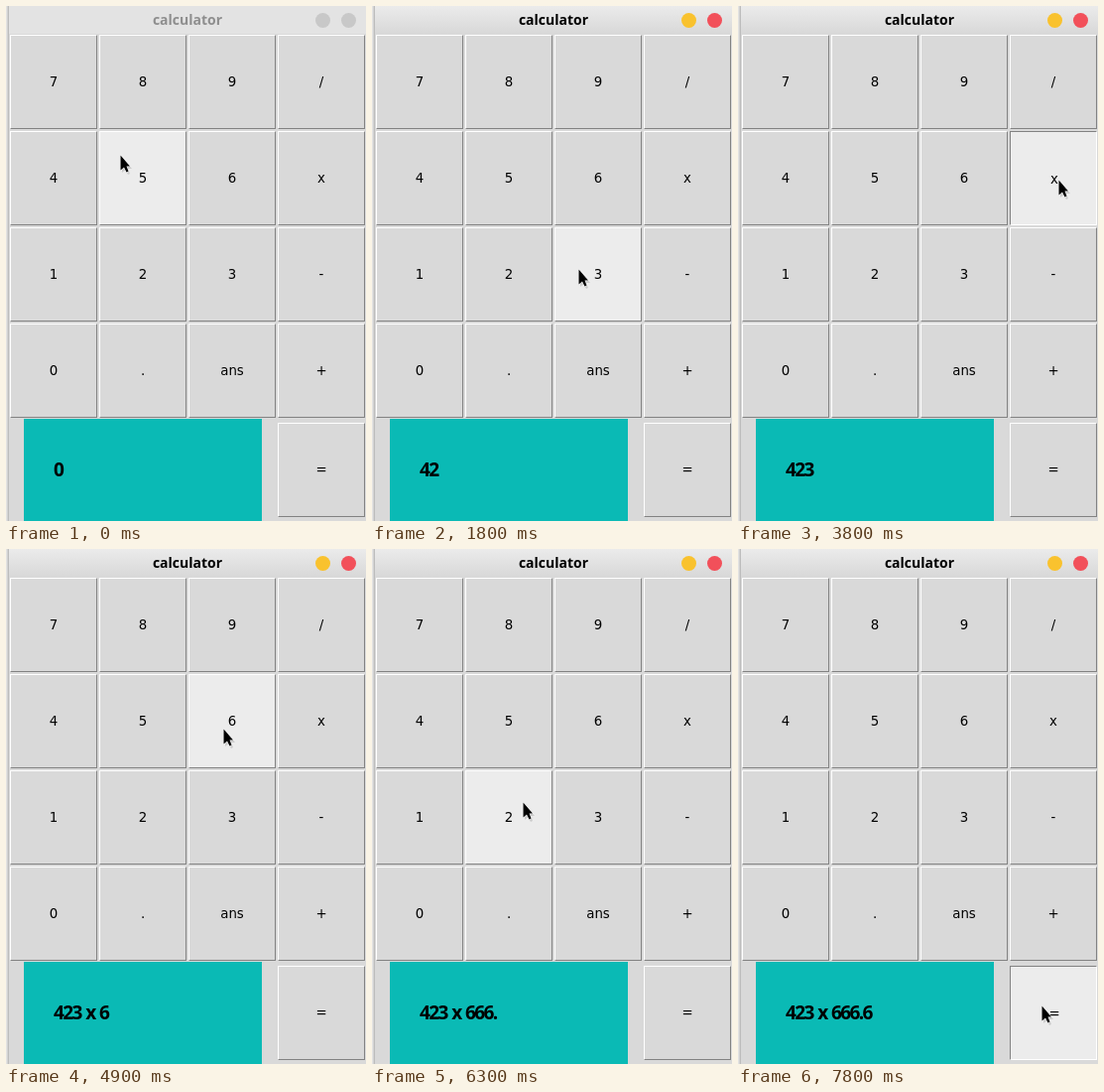
Animation, 363 px wide and 519 px high, one loop 8 s. Source, as an HTML page:

```html
<!DOCTYPE html>
<html lang="en">
<head>
<meta charset="utf-8">
<title>calculator</title>
<style>
  html, body { margin: 0; width: 363px; height: 519px; overflow: hidden; background: #d9d9d9; }
  div { position: absolute; box-sizing: border-box; }
  #edge { left: 0; top: 0; width: 3px; height: 519px; background: linear-gradient(90deg, #e2e2e2 1px, #d2d2d2 1px 2px, #bdbdbd 2px); }
  #bar { left: 3px; top: 0; width: 360px; height: 28px; background: #e3e3e3; color: #8e8e8e;
    font: bold 14px/28px "Noto Sans", "Open Sans", sans-serif; text-align: center; }
  #bar i { position: absolute; top: 6.5px; width: 15px; height: 15px; border-radius: 50%; background: #c8c8c8; }
  .active#bar { background: linear-gradient(#ebebeb, #d8d8d8); color: #000; }
  .active#bar i { background: #f9c22e; }
  .active#bar i + i { background: #f2505a; }
  .key { width: 88px; height: 95px; background: #d9d9d9; border: 1px solid; border-color: #fff #828282 #828282 #fff;
    font: 13.33px/94px "DejaVu Sans", sans-serif; text-align: center; }
  .hover { background: #ececec; }
  .down { border-color: #828282 #fff #fff #828282; padding: 1px 0 0 2px; }
  #screen { left: 18px; top: 416px; width: 240px; height: 103px; padding-left: 30px; background: #0abab5;
    font: bold 19px/103px "Open Sans", "Noto Sans", sans-serif; letter-spacing: -1.65px; word-spacing: 1.3px; white-space: pre; }
  svg { position: absolute; left: 0; top: 0; overflow: visible; }
</style>
</head>
<body>
<div id="edge"></div>
<div id="bar">calculator<i style="left:308.5px"></i><i style="left:334.5px"></i></div>
<div id="screen"></div>
<svg width="1" height="1"><g id="cursor">
  <path d="M2 2V18L5.500 15L8 20L10 19L8 14H12Z" fill="#0002"/>
  <path d="M.5 .5V15.500L4 12.500L6.500 17.500L8.500 16.500L6.500 11.500H10Z" stroke="#fff" stroke-linejoin="round" paint-order="stroke"/>
</g></svg>
<script>
const $ = id => document.getElementById(id);
const keys = {};
['7', '8', '9', '/', '4', '5', '6', 'x', '1', '2', '3', '-', '0', '.', 'ans', '+', '='].forEach((label, i) => {
  const el = document.createElement('div');
  const last = label === '=';
  el.textContent = label;
  el.style.left = 4 + 90 * (last ? 3 : i % 4) + 'px';
  el.style.top = (last ? 420 : 29 + 97 * (i >> 2)) + 'px';
  $('screen').before(el);
  keys[label] = el;
});

// Pointer states: time in tenths of a second, x, y, key under pointer, pressed
const moves = [
  [0, 115, 150, '5'], [6, 108, 157, '5'], [7, 92, 166, '4'], [8, 78, 172, '4'], [9, 70, 173, '4', 1],
  [11, 70, 173, '4'], [12, 75, 173, '5'], [13, 125, 235, '2'], [15, 140, 262, '2', 1], [16, 143, 264, '2'],
  [17, 178, 266, '3'], [18, 208, 265, '3'], [19, 225, 264, '3'], [20, 228, 264, '3', 1], [22, 228, 264, '3'],
  [26, 279, 245, '-'], [27, 290, 215, 'x'], [28, 283, 190, 'x'], [29, 256, 186, '6'], [30, 246, 208, '6'],
  [31, 252, 250, '3'], [32, 278, 285, '-'], [33, 296, 302, '-'], [34, 304, 308, '-'],
  [35, 308, 290, '-'], [36, 314, 240, '-'], [37, 321, 190, 'x'], [38, 323, 175, 'x', 1], [43, 323, 175, 'x'],
  [44, 270, 180, '6'], [45, 222, 181, '6'], [47, 219, 181, '6', 1], [49, 219, 181, '6'], [50, 219, 181, '6', 1],
  [51, 219, 181, '6'], [54, 219, 181, '2'], [56, 146, 280, '2'], [57, 134, 325, '.'], [58, 134, 350, '.'],
  [59, 134, 355, '.', 1], [61, 134, 355, '.'], [62, 138, 315, '2'], [63, 152, 255, '2'], [64, 167, 200, '6'],
  [66, 220, 184, '6'], [67, 228, 183, '6', 1], [69, 228, 183, '6'],
  [72, 233, 210, '6'], [73, 243, 250, '3']
];
// Final sweep down to the equals key
['ans', '+', '=', '='].forEach((k, i) =>
  moves.push([74 + i, 306 - 5 * (3 - i) ** 2, 458 - 14 * (3 - i) ** 2, k]));
moves.push([78, 306, 460, '=', 1]);

const typed = [[11, '4'], [16, '2'], [22, '3'], [43, ' x '], [49, '6'], [51, '6'], [52, '6'], [61, '.'], [69, '6']];

function draw(now) {
  const t = Math.floor(now % 8000 / 100 + 1e-6);
  const [, x, y, over, down] = moves.findLast(m => m[0] <= t);
  for (const k in keys)
    keys[k].className = 'key' + (k === over ? ' hover' + (down ? ' down' : '') : '');
  $('cursor').setAttribute('transform', `translate(${x} ${y})`);
  $('bar').className = t >= 11 ? 'active' : '';
  $('screen').textContent = typed.filter(e => e[0] <= t).map(e => e[1]).join('') || '0';
}
const start = performance.now();
(function loop() {
  draw(performance.now() - start);
  requestAnimationFrame(loop);
})();
</script>
</body>
</html>
```
